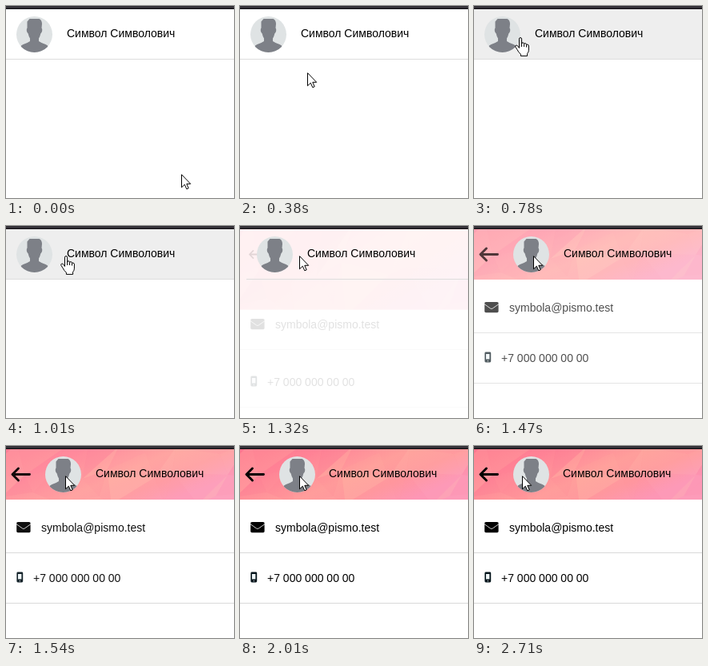
An HTML page that plays this animation: 285x240 px, repeating every 2790 ms.

```html
<!DOCTYPE html>
<html lang="ru">
<head>
<meta charset="utf-8">
<title>Contact card</title>
<style>
  html, body { margin: 0; width: 100%; height: 100%; overflow: hidden; background: #fff; }
  svg { display: block; }
  text { font: 14px "Liberation Sans", Arial, sans-serif; }
</style>
</head>
<body>
<svg width="285" height="240" viewBox="0 0 285 240">
  <defs>
    <linearGradient id="pink" x1="0" y1="0" x2="1" y2=".5">
      <stop offset="0" stop-color="#ff7890"/>
      <stop offset=".3" stop-color="#ff8797"/>
      <stop offset=".6" stop-color="#ffa09c"/>
      <stop offset=".8" stop-color="#ff9a9f"/>
      <stop offset="1" stop-color="#fd9bb9"/>
    </linearGradient>
    <clipPath id="disc"><circle r="22.5"/></clipPath>
    <clipPath id="strip"><rect width="285" height="63"/></clipPath>
  </defs>

  <rect id="hover" y="4" width="285" height="62" fill="#eee"/>

  <g id="banner">
    <rect width="285" height="63" fill="url(#pink)"/>
    <g id="facets" clip-path="url(#strip)"></g>
  </g>

  <rect id="rule" y="66" width="285" height="1" fill="#ddd"/>

  <path id="back" d="M29.5 35.5H9M15.5 28L8 35.5L15.5 43" fill="none" stroke="#000" stroke-width="2.9" stroke-linecap="round" stroke-linejoin="round"/>

  <g id="avatar">
    <circle r="22.5" fill="#dfe3e4"/>
    <path clip-path="url(#disc)" fill="#7d8087" d="M-9 -16L-6 -19.5H6Q9.5 -18 9.5 -13L9 -8Q10.5 -6 9 -2.5L7.8 -1Q7 3 5.5 5V8.5Q9 11 14 12.5Q19 14 21 24H-21Q-19 14 -14 12.5Q-9 11 -5.5 8.5V5Q-7 3 -7.8 -1L-9 -2.5Q-10.5 -6 -9 -8Z"/>
  </g>
  <text id="name" x="76" y="39">Символ Символович</text>

  <g id="mail">
    <rect x="13.2" y="95" width="17.4" height="13.2" rx="1.6"/>
    <path d="M13 97.6L20.5 103Q21.9 104 23.3 103L31 97.6" fill="none" stroke="#fff" stroke-width=".8"/>
    <text x="44" y="107">symbola@pismo.test</text>
    <rect y="133" width="285" height="1" fill="#d8d8d8"/>
  </g>

  <g id="phone">
    <rect x="13.4" y="157.5" width="7.8" height="13" rx="1.4" fill="#04141b"/>
    <rect x="15" y="160" width="4.4" height="6.5" fill="#eef6f8"/>
    <circle cx="17.3" cy="168.7" r=".6" fill="#fff"/>
    <text x="34" y="170">+7 000 000 00 00</text>
    <rect y="196" width="285" height="1" fill="#d8d8d8"/>
  </g>

  <rect width="285" height="3" fill="#353238"/>
  <rect y="3" width="285" height="1" fill="#0c0a0e"/>

  <path id="arrow" d="M.5 .7V16.8L4.3 13.2L6.8 18.8L9.2 17.8L6.8 12.3H11.7Z" fill="#fff" stroke="#000"/>
  <path id="hand" d="M5.5 13.5V2.2Q5.5 .6 7 .6Q8.6 .6 8.6 2.2V8Q8.8 6.8 10.1 6.8Q11.6 6.9 11.6 8.5Q11.9 7.6 13.1 7.7Q14.5 7.8 14.5 9.5Q14.9 8.9 15.9 9.1Q17.4 9.4 17.4 11V16.2Q17.4 18.5 15.6 20.5V23.4H7.4V21.2Q4.6 18.8 3 15.5L1 12.4Q.2 10.7 1.5 10.2Q2.8 9.8 4 11.3ZM8.6 8V12M11.6 8.5V12M14.5 9.5V12.5" fill="#fff" stroke="#000" stroke-linejoin="round"/>
</svg>
<script>
const LOOP = 2790, STEP = LOOP / 36;
const ENTER = 7, CLICK = 16, SETTLE = 26, NUDGE = 35;   // in steps

const $ = id => document.getElementById(id);
const move = (id, x, y, extra = "") => $(id).setAttribute("transform", `translate(${x} ${y}) ${extra}`);
const fade = (id, a) => $(id).setAttribute("opacity", a);
const mix = (a, b, p) => a + (b - a) * p;
const smooth = u => {
  u = Math.min(1, Math.max(0, u));
  return u * u * (3 - 2 * u);
};

// step, x, y of the pointer tip
const stops = [[0, 219, 210], [ENTER, 50, 52], [8, 44, 50], [10, 57, 39], [13, 74, 37]];

function pointerAt(n) {
  if (n >= NUDGE) return [60, 37];
  const i = stops.findIndex(s => s[0] > n);
  if (i < 0) return stops.at(-1).slice(1);
  const [n0, x0, y0] = stops[i - 1], [n1, x1, y1] = stops[i];
  const p = smooth((n - n0) / (n1 - n0));
  return [mix(x0, x1, p), mix(y0, y1, p)].map(Math.round);
}

// Jittered triangle mesh with faint light and dark facets
function buildFacets() {
  let seed = 11;
  const rand = () => (seed = seed * 16807 % 2147483647) / 2147483647;
  const cols = 8, rows = 2, w = 285 / (cols - 1), h = 63 / rows;
  const node = (_, i) => [(i % (cols + 1) - .5 + (rand() - .5) * .8) * w,
                          (Math.floor(i / (cols + 1)) + (rand() - .5) * .6) * h];
  const pts = Array.from({ length: (cols + 1) * (rows + 1) }, node);
  const facet = ids => {
    const tone = rand() < .5 ? "#ffc4a8" : "#f9688c";
    return `<polygon points="${ids.map(i => pts[i]).join(" ")}" fill="${tone}" opacity="${rand() * .2}"/>`;
  };
  let out = "";
  for (let r = 0; r < rows; r++) {
    for (let c = 0; c < cols; c++) {
      const a = r * (cols + 1) + c, b = a + cols + 1;
      out += facet([a, a + 1, b]) + facet([a + 1, b + 1, b]);
    }
  }
  $("facets").innerHTML = out;
}

function draw(t) {
  const n = Math.floor((t + 10) / STEP);
  const k = n - CLICK;
  const slide = smooth((k - .2) / 2.67), rest = 1 - slide;
  const ink = smooth(k * .21);
  const over = n >= ENTER && k < 0;

  const [x, y] = pointerAt(n);
  move("arrow", x, y);
  move("hand", x - 6, y);
  fade("arrow", over ? 0 : 1);
  fade("hand", over ? 1 : 0);
  fade("hover", over ? 1 : k === 0 ? .5 : 0);

  const shift = Math.round(36 * slide);
  move("banner", 0, 4, `scale(1 ${1 + 48 * rest / 63})`);
  move("rule", shift, 0);
  fade("rule", slide < .5 ? 1 : 0);
  move("back", 18, 35.5, `scale(${mix(.5, 1, slide)}) translate(-18 -35.5)`);
  move("avatar", 35.5 + shift, 35.5);
  move("name", n < SETTLE ? shift : 35, 0);
  move("mail", 0, Math.round(27 * rest));
  move("phone", 0, Math.round(38 * rest));
  for (const id of ["banner", "back", "mail", "phone"]) fade(id, ink);
}

buildFacets();
const start = performance.now();
function tick() {
  draw((performance.now() - start) % LOOP);
  requestAnimationFrame(tick);
}
tick();
</script>
</body>
</html>
```
